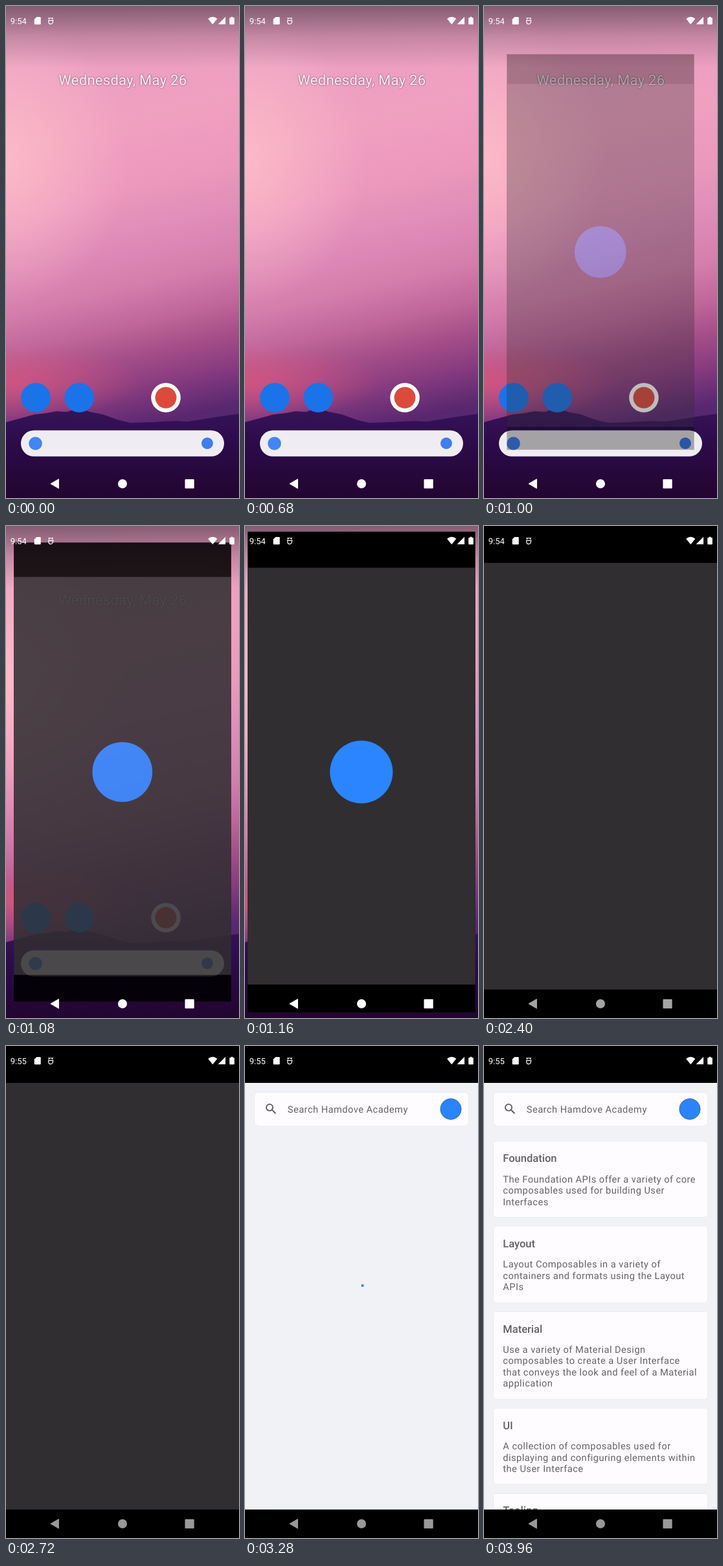
Recreate the animation shown at these times as an HTML page. Size 360 by 760 pixels, loop 4000 ms.

```html
<!DOCTYPE html>
<html lang="en">
<head>
<meta charset="utf-8">
<title>App launch</title>
<style>
html, body { margin: 0; width: 100%; height: 100%; overflow: hidden; background: #000; }
svg { display: block; width: 100vw; height: 100vh; font-family: Roboto, sans-serif; }
text { white-space: pre; text-rendering: geometricPrecision; }
.date { font-size: 22px; letter-spacing: .28px; fill: #f8eef4; filter: drop-shadow(0 0 1.2px rgba(60, 30, 50, .75)); }
.body { font-size: 14.67px; letter-spacing: .458px; fill: #656366; }
.title { font-size: 16.5px; font-weight: 500; fill: #626063; }
.card { fill: #fefcff; filter: drop-shadow(0 .8px .7px rgba(0, 0, 0, .22)); }
.clock { font-size: 13px; fill: #fff; }
</style>
</head>
<body>
<svg viewBox="0 0 360 760">
  <defs>
    <linearGradient id="sky" gradientUnits="userSpaceOnUse" x1="105" y1="0" x2="255" y2="640">
      <stop offset="0" stop-color="#e49dbf"/>
      <stop offset=".12" stop-color="#eb9fc1"/>
      <stop offset=".3" stop-color="#f0a0bf"/>
      <stop offset=".45" stop-color="#eb98bd"/>
      <stop offset=".56" stop-color="#df8cb9"/>
      <stop offset=".67" stop-color="#d57eac"/>
      <stop offset=".76" stop-color="#c0669a"/>
      <stop offset=".83" stop-color="#a64f89"/>
      <stop offset=".91" stop-color="#873b7f"/>
      <stop offset="1" stop-color="#572770"/>
    </linearGradient>
    <radialGradient id="glow" gradientUnits="userSpaceOnUse" cx="0" cy="0" r="1" gradientTransform="translate(-10 235) scale(200 230)">
      <stop offset="0" stop-color="#ffbfca" stop-opacity=".85"/>
      <stop offset="1" stop-color="#ffbfca" stop-opacity="0"/>
    </radialGradient>
    <radialGradient id="dusk" gradientUnits="userSpaceOnUse" cx="0" cy="0" r="1" gradientTransform="translate(0 580) scale(210 60)">
      <stop offset="0" stop-color="#d9567f" stop-opacity=".8"/>
      <stop offset="1" stop-color="#d9567f" stop-opacity="0"/>
    </radialGradient>
    <linearGradient id="scrim" x2="0" y2="1">
      <stop offset="0" stop-color="#1c1420" stop-opacity=".48"/>
      <stop offset=".5" stop-color="#1c1420" stop-opacity=".18"/>
      <stop offset="1" stop-color="#1c1420" stop-opacity="0"/>
    </linearGradient>
    <linearGradient id="hill" gradientUnits="userSpaceOnUse" x1="0" y1="620" x2="0" y2="760">
      <stop offset="0" stop-color="#37145a"/>
      <stop offset=".4" stop-color="#2c0b4b"/>
      <stop offset="1" stop-color="#22052f"/>
    </linearGradient>
  </defs>

  <g id="home">
    <rect width="360" height="760" fill="url(#sky)"/>
    <rect width="360" height="500" fill="url(#glow)"/>
    <rect y="500" width="360" height="160" fill="url(#dusk)"/>
    <rect width="360" height="95" fill="url(#scrim)"/>
    <path fill="url(#hill)" d="M0 643L22 637L44 631L62 629L78 626L94 627L112 621L130 627L150 631L172 639L192 644L222 643L262 641L280 642L306 638L330 634L360 630V760H0z"/>
    <text class="date" x="81.3" y="122">Wednesday, May 26</text>
    <circle cx="46" cy="605" r="22.8" fill="#1a73e8"/>
    <circle cx="113.2" cy="605" r="22.8" fill="#1a73e8"/>
    <circle cx="247" cy="605" r="22.8" fill="#fff"/>
    <circle cx="247" cy="605" r="16.5" fill="#dc4a3d"/>
    <rect x="23" y="655.5" width="314" height="40.3" rx="20.1" fill="#f0edf2"/>
    <circle cx="45.5" cy="675.7" r="10.3" fill="#4285f4"/>
    <circle cx="311" cy="675.5" r="9" fill="#3f7df0"/>
  </g>

  <g id="splash">
    <rect width="360" height="760"/>
    <rect y="57" width="360" height="659" fill="#302e31"/>
    <circle id="logo" cx="179.8" cy="380" r="49.7" fill="#2a85ff"/>
  </g>

  <g id="app">
    <rect width="360" height="760"/>
    <rect y="57" width="360" height="659" fill="#f1f2f6"/>
    <g id="cards"></g>
    <rect class="card" x="14.7" y="71.5" width="330.6" height="51.4" rx="6"/>
    <g transform="translate(29.3 86.2) scale(.917)" fill="none" stroke="#5c5a5d" stroke-width="2">
      <circle cx="9.5" cy="9.5" r="5.5"/>
      <path d="M13.6 13.6l6.1 6.1"/>
    </g>
    <text class="body" x="65.8" y="103.2">Search Hamdove Academy</text>
    <circle cx="318" cy="97.4" r="16.1" fill="#2b84fb" stroke="#2a5da6" stroke-width=".8"/>
    <path id="spinner" fill="none" stroke="#3b82e6" stroke-width="3.67" stroke-linecap="square"/>
    <rect y="716" width="360" height="44"/>
  </g>

  <g fill="#fff">
    <text id="clock" class="clock" x="6.8" y="27.7"></text>
    <path d="M47.2 17h5.3q1.2 0 1.2 1.2v9q0 1.2-1.2 1.2h-7.6q-1.2 0-1.2-1.2v-6.6z"/>
    <path d="M65.6 18l1.6 1.6M72.6 18l-1.6 1.6M65.8 20.6q3.3-4.2 6.6 0M65 22.4h8.4M65.8 22.4v2.2a3.3 3.3 0 0 0 6.6 0v-2.2" fill="none" stroke="#fff" stroke-width="1.2"/>
    <path d="M312.2 19.8Q319.3 13.8 326.4 19.8L319.3 28.4z"/>
    <path d="M327.6 28.3h11.5V16.8z"/>
    <path d="M347.6 16.7h3v1.2h1.4q.9 0 .9.9v8.8q0 .9-.9.9h-5.8q-.9 0-.9-.9v-8.8q0-.9.9-.9h1.4z"/>
    <g id="nav">
      <path d="M69 738L81.4 730.8V745.2z" stroke="#fff" stroke-linejoin="round"/>
      <circle cx="180" cy="738" r="7"/>
      <rect x="276.5" y="731" width="14.2" height="14.2" rx="1"/>
    </g>
  </g>
</svg>
<script>
const LOOP = 4000, STEP = 40;
const OPEN = 955, LOGO_OUT = 2000, MINUTE = 2480, READY = 3280, LOADED = 3680;
const el = id => document.getElementById(id);
const [home, splash, logo, app, cards, spinner, clock, nav] =
  ['home', 'splash', 'logo', 'app', 'cards', 'spinner', 'clock', 'nav'].map(el);
const clamp = v => Math.min(1, Math.max(0, v));
const show = (node, on) => node.setAttribute('display', on ? 'inline' : 'none');

const topics = [
  ['Foundation', 'The Foundation APIs offer a variety of core', 'composables used for building User', 'Interfaces'],
  ['Layout', 'Layout Composables in a variety of', 'containers and formats using the Layout', 'APIs'],
  ['Material', 'Use a variety of Material Design', 'composables to create a User Interface', 'that conveys the look and feel of a Material', 'application'],
  ['UI', 'A collection of composables used for', 'displaying and configuring elements within', 'the User Interface'],
  ['Tooling', '', '', '']
];

function buildCards() {
  const lineHeight = 17.4;
  let y = 147.3, out = '';
  for (const [title, ...lines] of topics) {
    const h = 64.8 + lines.length * lineHeight;
    out += `<rect class="card" x="14.7" y="${y}" width="330.6" height="${h}" rx="3.7"/>`;
    out += `<text class="title" x="29.3" y="${y + 32}">${title}</text>`;
    lines.forEach((s, i) => {
      out += `<text class="body" x="29.3" y="${y + 63.4 + i * lineHeight}">${s}</text>`;
    });
    y += h + 14.67;
  }
  cards.innerHTML = out;
}

// cubic-bezier(.4, 0, .2, 1)
function ease(x) {
  let lo = 0, hi = 1, u = x;
  for (let i = 0; i < 24; i++) {
    u = (lo + hi) / 2;
    const bx = 1.2 * u * (1 - u) ** 2 + .6 * u * u * (1 - u) + u ** 3;
    if (bx < x) lo = u; else hi = u;
  }
  return 3 * u * u * (1 - u) + u ** 3;
}

// Indeterminate ring: head runs ahead for half a turn, then the tail catches up
function ring(ms) {
  const r = 16.5, cx = 180, cy = 386.5, half = 666;
  const head = 290 * ease(clamp(ms / half));
  const tail = 290 * ease(clamp(ms / half - 1));
  const from = tail + 286 * ms / (2 * half) + 5.73;
  const sweep = Math.max(head - tail, .1);
  const at = deg => {
    const a = deg * Math.PI / 180;
    return `${(cx + r * Math.sin(a)).toFixed(3)} ${(cy - r * Math.cos(a)).toFixed(3)}`;
  };
  return `M${at(from)}A${r} ${r} 0 ${sweep > 180 ? 1 : 0} 1 ${at(from + sweep)}`;
}

function render(t) {
  const alpha = clamp((t - OPEN) / 145);
  const gap = t < 1440 ? .196 * Math.exp(-(t - 1000) * .0134) : 0;
  show(home, t < 1480);
  show(splash, t > OPEN && t < READY);
  splash.setAttribute('opacity', alpha);
  splash.setAttribute('transform', `translate(180 380) scale(${1 - gap}) translate(-180 -380)`);
  logo.setAttribute('opacity', 1 - clamp((t - LOGO_OUT) / 150));

  const dim = (1 - Math.cos(Math.PI * clamp((t - 1220) / 1500))) / 2;
  nav.setAttribute('opacity', 1 - .4 * dim);
  clock.textContent = t < MINUTE ? '9:54' : '9:55';

  show(app, t >= READY);
  show(cards, t >= LOADED);
  show(spinner, t >= READY && t < LOADED);
  if (t >= READY && t < LOADED) spinner.setAttribute('d', ring(t - READY));
}

function tick() {
  const t = performance.now() % LOOP;
  render(Math.floor(t / STEP) * STEP);
  requestAnimationFrame(tick);
}

buildCards();
tick();
</script>
</body>
</html>
```
